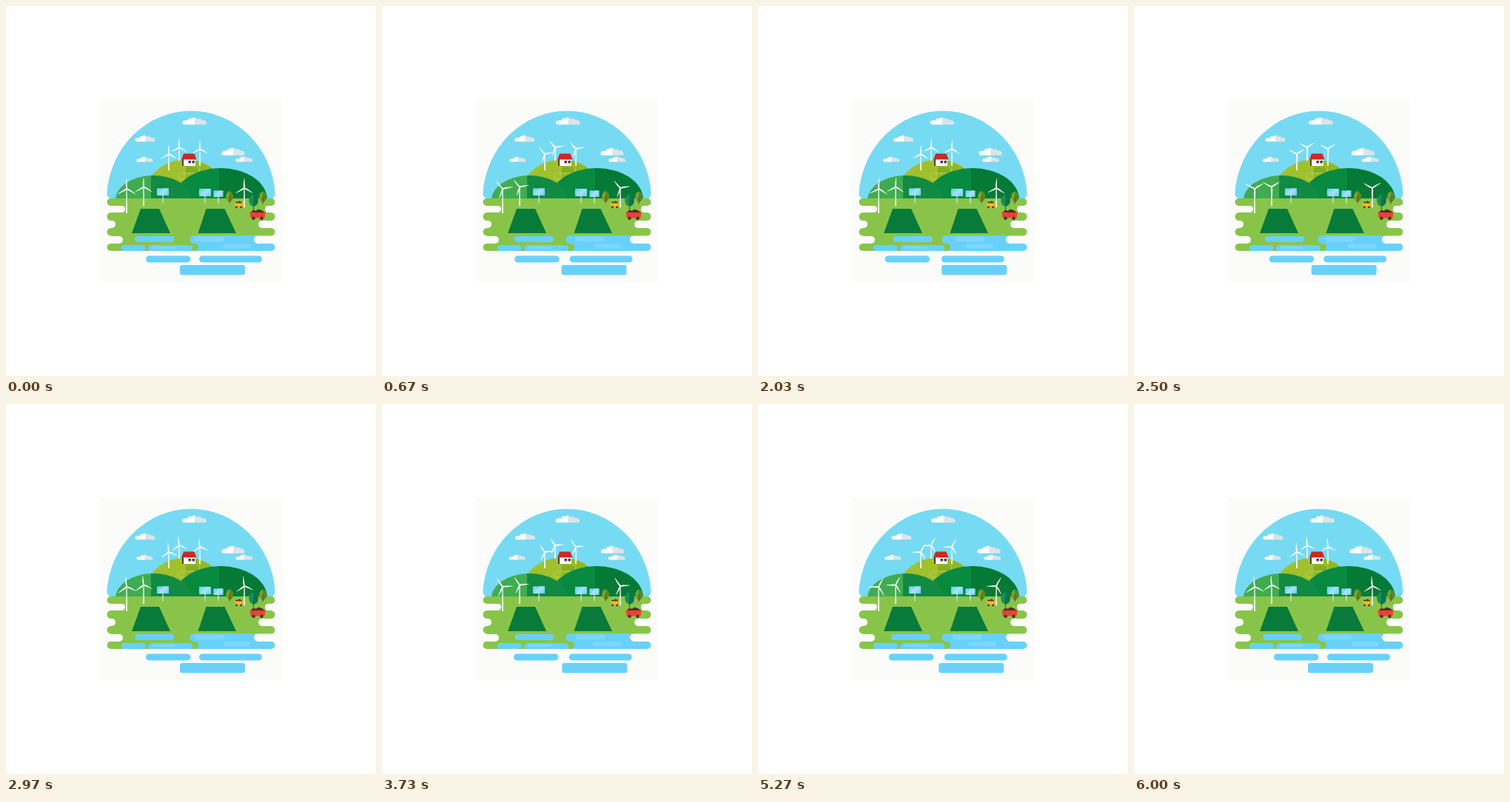
An HTML page for the animation above (6.03 s loop, 500 by 500 pixels).

```html
<!DOCTYPE html>
<html lang="en">
<head>
<meta charset="utf-8">
<title>Green island</title>
<style>
  html, body { margin: 0; width: 100%; height: 100%; overflow: hidden; background: #fff; }
  svg { display: block; width: 100vw; height: 100vh; }
</style>
</head>
<body>
<svg id="stage" viewBox="0 0 500 500"></svg>
<script>
const NS = 'http://www.w3.org/2000/svg';
const stage = document.getElementById('stage');
const PAPER = '#fbfbfa', GRASS = '#89c44a', WATER = '#68d1fb', PALE = '#7ed7fb', SKY = '#77daf3';
const FRAMES = 181, LOOP = 6030;
const sliders = [];
const rotors = [];

function add(tag, attrs, parent = stage) {
  const el = document.createElementNS(NS, tag);
  for (const key in attrs) el.setAttribute(key, attrs[key]);
  parent.appendChild(el);
  return el;
}
const path = (d, fill, parent) => add('path', { d, fill }, parent);
const line = (d, stroke, width, parent) =>
  add('path', { d, stroke, 'stroke-width': width, fill: 'none', 'stroke-linecap': 'round' }, parent);
const box = (x1, y1, x2, y2, fill, rx = 0, parent) =>
  add('rect', { x: x1, y: y1, width: x2 - x1, height: y2 - y1, rx, fill }, parent);
const pill = (x1, y1, x2, y2, fill, parent) => box(x1, y1, x2, y2, fill, (y2 - y1) / 2, parent);
const dot = (cx, cy, r, fill) => add('circle', { cx, cy, r, fill });

// Moves sideways by dx and back, twice per loop
function slider(dx) {
  const el = add('g', {});
  sliders.push({ el, dx });
  return el;
}

function cloud(x, y, w, h, dx) {
  const a = `translate(${x} ${y}) scale(${w / 32} ${h / 9})`;
  const inner = add('g', { transform: a }, slider(dx));
  path('M2.5 9 A2.6 2.6 0 0 1 2.5 3.8 Q5 2.5 7 4 Q8 0 12 1 Q14 -1 17 0 V9 Z', '#fff', inner);
  path('M16 9 V0 Q19 0 20 2 Q24 0 26 3.5 Q29 2 31 4.5 Q33.5 8.5 29.5 9 Z', '#dfe4e6', inner);
}

function hill(cx, base, rx, ry, split, left, right) {
  const k = base - ry * Math.sqrt(1 - ((split - cx) / rx) ** 2);
  path(`M${cx - rx} ${base} A${rx} ${ry} 0 0 1 ${split} ${k} V${base} Z`, left);
  path(`M${split} ${base} V${k} A${rx} ${ry} 0 0 1 ${cx + rx} ${base} Z`, right);
}

function turbine(x, y, foot, blade) {
  path(`M${x - .6} ${y} H${x + .6} L${x + 1} ${foot} H${x - 1} Z`, '#f0f7f1');
  const g = add('g', {});
  for (const turn of [0, 120, 240]) {
    add('path', {
      d: `M-.5 0 L-1.2 ${-blade * .3} L-.2 ${-blade} H.3 L.9 0 Z`,
      fill: '#fbfdfb', transform: `rotate(${turn})`
    }, g);
  }
  add('circle', { r: 1.2, fill: '#fbfdfb' }, g);
  rotors.push({ g, x, y });
}

function panel(x1, y1, x2, y2, foot) {
  const mid = (x1 + x2) / 2, w = (x2 - x1) / 4;
  line(`M${mid} ${y2} V${foot}`, '#d5ecdf', 1.2);
  box(x1, y1, x2, y2, '#7cd2f3');
  path(`M${x1} ${y2} L${mid + 1} ${y1} H${x2} L${mid + 1} ${y2} Z`, '#9bdef7');
  line(`M${x1 + w} ${y1} V${y2} M${mid} ${y1} V${y2} M${x2 - w} ${y1} V${y2} M${x1} ${(y1 + y2) / 2} H${x2}`, '#b9e8f8', .4);
}

function tree(x, y, rx, ry, left, right, foot) {
  add('ellipse', { cx: x, cy: y, rx, ry, fill: left });
  path(`M${x} ${y - ry} A${rx} ${ry} 0 0 1 ${x} ${y + ry} Z`, right);
  line(`M${x} ${y} V${foot}`, '#6b4a25', 1.1);
}

function cart(x1, y1, x2, y2, load, fill, wheel) {
  const w = x2 - x1;
  path(`M${x1 + 1} ${y1} L${x1 + w * .22} ${y1 - load * .7} L${x1 + w * .4} ${y1 - load * .5} L${x1 + w * .55} ${y1 - load} L${x2 - w * .2} ${y1 - load * .6} L${x2 - 1} ${y1} Z`, '#4b3328');
  path(`M${x1} ${y1} H${x2} L${x2 - 1} ${y2} H${x1 + 1} Z`, fill);
  dot(x1 + w * .24, y2 + .4, wheel, '#39352f');
  dot(x2 - w * .24, y2 + .4, wheel, '#39352f');
}

// Sky
box(127, 127, 374, 373, PAPER);
path('M136.3 253 A114 120 0 0 1 363.7 253 Q363.5 259 357 262 H143 Q136.5 259 136.3 253 Z', SKY);
cloud(238.5, 151, 32.5, 9.3, -8);
cloud(174.5, 175, 27, 8.3, 12);
cloud(176.5, 204, 22, 6.5, -10);
cloud(291.5, 192, 31, 9.8, 10);
cloud(310.5, 203.7, 23, 6.8, -10);

// Hills and house
hill(243, 262, 58, 54.5, 243, '#a0c12d', '#94b824');
path('M243 218 H260 Q262 222 258 226 H243 Z', '#84ae24');
line('M259 217.5 Q264 222 258 226 H237 Q233 226 232.5 230 Q233 234 237 234 H246', '#b9d36a', .9);
turbine(234, 191, 209, 11.5);
turbine(220, 200, 222, 12);
turbine(262, 193, 216, 11.5);
box(238.5, 207, 256, 216, '#fff');
box(238, 207, 240, 216, '#513a39');
path('M240 199.5 H254.5 L257.5 207.5 H237 Z', '#d0281f');
box(246.5, 209, 250, 212.5, '#4a4145');
box(251.5, 209, 255, 212.5, '#4a4145');
hill(290, 262, 63, 43, 288, '#078a40', '#047a36');
hill(199.5, 262, 51.5, 33, 196, '#40ac50', '#118a43');

// Ground with notched sides
box(142, 260, 352, 331, GRASS);
[[270, 279, 161], [290, 300, 148], [311, 321, 158]].forEach(([y1, y2, x]) => pill(128, y1, x, y2, PAPER));
[[270, 279, 350], [290, 300, 341], [310, 321, 335]].forEach(([y1, y2, x]) => pill(x, y1, 372, y2, PAPER));
pill(136.5, 260, 363.5, 270, GRASS);
pill(136.5, 279, 363.5, 290, GRASS);
pill(136.5, 300, 363.5, 310.5, GRASS);
path('M182 274 H207 L222 307 H170 Z', '#087b3a');
path('M270.5 274 H295.5 L311 307 H259.5 Z', '#087b3a');

// Water
path('M254 310 H340 Q335 311 335 315.5 Q335 320.5 340 321 H358.5 A5 5 0 0 1 358.5 331 H254 V321 A5.5 5.5 0 0 1 254 310 Z', WATER);
pill(136.5, 321, 260, 331, GRASS);
pill(156, 323, 188.5, 331, WATER);
pill(192, 323, 252, 331, WATER);
pill(197, 325, 229, 328.5, PALE);
pill(174, 311, 227, 319, WATER, slider(12));
pill(255, 311.5, 295, 318, PALE, slider(15));
pill(294, 321.5, 331, 327.5, PALE, slider(-18));
pill(189, 337.5, 249.5, 346.5, WATER, slider(-24));
pill(261, 337.5, 346, 346.5, WATER, slider(-18));
box(235, 350, 323, 363.5, WATER, 3, slider(18));

// Things on the meadow
turbine(163, 247, 280, 14);
turbine(186, 244.5, 270, 12.5);
panel(204, 246.5, 220, 256, 266);
panel(261, 247, 277, 257, 266);
panel(280.5, 249.5, 293.5, 258, 266);
tree(302, 257.5, 4.8, 7.2, '#7da02a', '#5c861f', 266);
tree(347, 258, 4.8, 7.2, '#74a02c', '#528724', 267);
turbine(322, 246, 272, 13);
tree(334.5, 262.5, 6.3, 8, '#159057', '#0a7549', 277);
cart(308.5, 266.5, 320.5, 271.5, 3, '#f9b520', 1.4);
cart(329.5, 279, 350.5, 286.5, 4.5, '#ef3f35', 2.2);

function draw(ms) {
  const frame = Math.floor((ms % LOOP + 4) * .03) % FRAMES;
  const phase = 2 * frame / FRAMES;
  const shift = (1 - Math.cos(phase * 2 * Math.PI)) / 2;
  for (const { el, dx } of sliders) el.setAttribute('transform', `translate(${dx * shift} 0)`);
  for (const { g, x, y } of rotors) g.setAttribute('transform', `translate(${x} ${y}) rotate(${phase * 360})`);
}

const start = performance.now();
function tick() {
  draw(performance.now() - start);
  requestAnimationFrame(tick);
}
tick();
</script>
</body>
</html>
```
